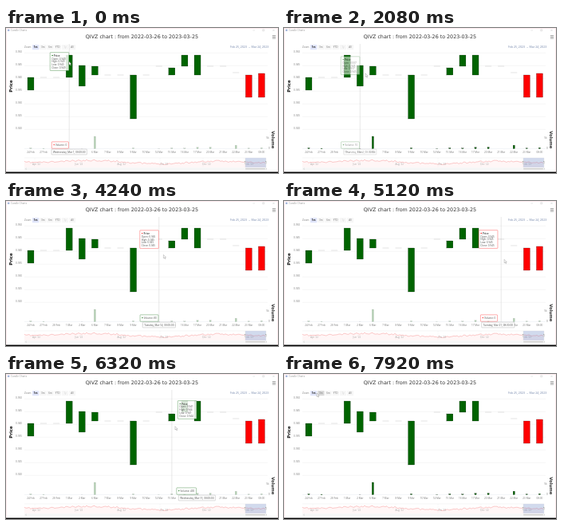
Write an HTML page that moves like this. It is 341 px wide and 182 px high and loops after 8000 ms.

```html
<!DOCTYPE html>
<html lang="en">
<head>
<meta charset="utf-8">
<title>Price chart</title>
<style>
html, body { margin: 0; width: 100%; height: 100%; overflow: hidden; background: #fff; }
svg { display: block; width: 100vw; height: 100vh; }
text { font-family: "Open Sans", "Liberation Sans", sans-serif; font-size: 3.1px; fill: #777; }
.title { font: 6.35px "DejaVu Sans", sans-serif; fill: #333; }
.axis { font: bold 5.4px "DejaVu Sans", sans-serif; fill: #111; }
.mid { text-anchor: middle; }
.end { text-anchor: end; }
</style>
</head>
<body>
<svg id="stage" viewBox="0 0 341 182" preserveAspectRatio="none"></svg>
<script>
const NS = 'http://www.w3.org/2000/svg';
const stage = document.getElementById('stage');

function add(parent, tag, attrs, content) {
  const el = document.createElementNS(NS, tag);
  for (const k in attrs) el.setAttribute(k, attrs[k]);
  if (content !== undefined) el.textContent = content;
  parent.appendChild(el);
  return el;
}
const rect = (p, x, y, width, height, fill, more) => add(p, 'rect', { x, y, width, height, fill, ...more });
const path = (p, d, stroke, w, more) => add(p, 'path', { d, stroke, 'stroke-width': w, fill: 'none', ...more });
const label = (p, x, y, s, cls = '', more) => add(p, 'text', { x, y, class: cls, ...more }, s);
const set = (el, attrs) => { for (const k in attrs) el.setAttribute(k, attrs[k]); };

const LOOP = 8000, TOP = 31, BASE = 151.5;
const GREEN = '#006400', RED = '#ff0000';

// open and close heights of each session
const bars = [[78, 62], [62, 62], [62, 62], [62, 34], [73, 47], [59, 48], [59, 59], [59, 59], [114, 59], [59, 59],
  [48, 48], [59, 50], [48, 34], [59, 34], [48, 48], [48, 48], [56, 56], [59, 87], [57, 87]];
const volume = [400, 200, 0, 0, 10, 6580, 0, 0, 420, 0, 80, 400, 300, 750, 800, 0, 1850, 300, 500];
const days = [24, 27, 28, 1, 2, 6, 7, 8, 9, 10, 14, 15, 16, 17, 20, 21, 22, 23, 24];
const week = ['Sunday', 'Monday', 'Tuesday', 'Wednesday', 'Thursday', 'Friday', 'Saturday'];
const month = i => i < 3 ? 'Feb' : 'Mar';
const barX = i => 31 + i * 16.08;
const price = y => (0.95 - (y - TOP) / 16 * 0.005).toFixed(3);
const volTop = i => BASE - volume[i] / 6580 * 15.5;

function drawWindow() {
  path(stage, 'M0.3 181V.3H340.7V181', '#f6d3d9', .6);
  rect(stage, 2, 1.6, 2.4, 2.4, '#a9b8dc');
  label(stage, 6, 3.9, 'Candle Charts', '', { style: 'fill:#999' });
  path(stage, 'M309.5 3h2.4M321.7 1.8h2v2h-2zM334.4 1.8l2.2 2.2m0-2.2l-2.2 2.2', '#999', .25);
  path(stage, 'M333.9 9.6h4.2m-4.2 1.7h4.2m-4.2 1.7h4.2', '#666', .6);
  label(stage, 170.4, 13.4, 'QIVZ chart : from 2022-03-26 to 2023-03-25', 'title mid');
  rect(stage, 0, 180.6, 341, 1.4, '#000');
}

const buttons = [];
function drawRange() {
  label(stage, 23, 25.4, 'Zoom');
  ['1m', '3m', '6m', 'YTD', '1y', 'All'].forEach((s, i) => {
    const x = 33 + i * 9.2;
    buttons.push(rect(stage, x, 21, 8.3, 6.2, i ? '#f7f7f7' : '#e0e5fa', { rx: .5 }));
    label(stage, x + 4.1, 25.4, s, 'mid', { style: i ? (i === 4 ? 'fill:#ccc' : '') : 'font-weight:bold;fill:#222' });
  });
  label(stage, 329.3, 24.8, 'Feb 25, 2023  →  Mar 24, 2023', 'end', { style: 'font-size:3.6px;fill:#6f82a8' });
}

function drawAxes() {
  for (let k = 0; k < 7; k++) {
    const y = TOP + k * 16;
    path(stage, `M23 ${y + .3}H328`, '#e8e8e8', .4);
    label(stage, 20, y + .3, price(y), 'end');
  }
  label(stage, 0, 0, 'Price', 'axis mid', { transform: 'translate(8.2 73) rotate(-90)' });
  label(stage, 0, 0, 'Volume', 'axis mid', { transform: 'translate(332.8 140.3) rotate(90)', style: 'font-size:5.3px;fill:#333' });
  path(stage, `M23 ${BASE}H328`, '#dde1ea', .35);
  label(stage, 328, 139.4, '5k', 'mid');
  label(stage, 329, 152, '0');
  bars.forEach((b, i) => label(stage, barX(i), 156.6, i === 18 ? '08:00' : days[i] + ' ' + month(i), 'mid'));
}

function drawNavigator() {
  let seed = 11, d = '';
  const rnd = () => (seed = seed * 16807 % 2147483647) / 2147483647;
  for (let x = 23; x <= 326; x += 2) {
    const slope = 168 + 1.6 * Math.sin(x / 24) - Math.sin(x / 61 + 1);
    d += `${d ? 'L' : 'M'}${x} ${(slope + (rnd() - .5) * 2.2).toFixed(2)}`;
  }
  path(stage, 'M36 163v12M88 163v12M140 163v12M193 163v12M247 163v12M299 163v12', '#f1f1f1', .3);
  path(stage, d + 'V175H23z', 'none', 0, { style: 'fill:#ff000009' });
  path(stage, d, '#f47a7a', .4);
  ["Apr '22", "Jun '22", "Aug '22", "Oct '22", "Dec '22", "Feb '23"].forEach((s, i) =>
    label(stage, 38 + i * 53.4, 172, s, 'mid', { style: 'fill:#aaa' }));
  rect(stage, 300, 163, 26, 12, '#6685c2', { opacity: .3 });
  path(stage, 'M23 163H300V175H326V163H300', '#ddd', .3);
  for (const x of [299.4, 325.4]) rect(stage, x, 167.2, 1.3, 3.6, '#f2f2f2', { stroke: '#999', 'stroke-width': .25 });
  rect(stage, 23, 175.3, 304, 2.8, '#f6f6f6');
  rect(stage, 300, 176, 25, 1.4, '#d0d0d0', { rx: .7 });
  path(stage, 'M25.6 176l-1 .8l1 .8M325.8 176l1 .8l-1 .8', '#888', .3);
}

drawWindow();
drawRange();
drawAxes();
drawNavigator();

const cross = path(stage, '', '#c4c4c4', .4);
const candles = add(stage, 'g', {}), volBars = add(stage, 'g', {});
bars.forEach(([open, close], i) => {
  const x = barX(i);
  if (open === close) path(candles, `M${x - 4} ${close}h8`, '#888', .25);
  else rect(candles, x - 4, Math.min(open, close), 8, Math.abs(open - close),
    close < open ? GREEN : RED, { stroke: '#000', 'stroke-width': .2 });
  if (volume[i]) rect(volBars, x - 1.1, volTop(i), 2.2, BASE - volTop(i), GREEN, { stroke: '#000', 'stroke-width': .2 });
});

const tips = add(stage, 'g', {});
function makeTip(lines, height) {
  const g = add(tips, 'g', {});
  const box = rect(g, 0, 0, 23.6, height, '#fff', { 'fill-opacity': .85, rx: .6, 'stroke-width': .32 });
  const dot = add(g, 'circle', { cx: 2.9, cy: 3.8, r: .7 });
  const rows = Array.from({ length: lines }, (_, i) => label(g, i ? 2 : 4.6, 5 + i * 3.9, '', '', { style: 'fill:#555' }));
  return { g, box, dot, rows };
}
const priceTip = makeTip(5, 22.8), volTip = makeTip(1, 8.4), dateTip = makeTip(1, 6.8);
priceTip.rows[0].style.fontWeight = 'bold';
dateTip.dot.remove();
set(dateTip.rows[0], { x: 2, y: 4.6 });
set(dateTip.box, { stroke: '#888' });

const cursor = path(stage, 'M0 0V4.4L1.1 3.5L1.9 5.2L2.6 4.9L1.8 3.2H3.1Z', '#444', .25, { style: 'fill:#fff' });

// pointer stops: time, x, y
const stops = [[0, 79, 42], [420, 81, 44], [700, 92, 52], [1800, 94, 54], [2080, 102, 57], [2300, 106, 58],
  [2640, 121, 60], [2980, 123, 62], [3520, 164, 66], [4050, 197, 67.5], [4600, 198.5, 67.5], [5250, 285, 74],
  [5480, 317, 78], [5970, 316, 80], [6100, 300, 76], [6560, 113, 54], [7040, 109, 46], [7380, 76, 30],
  [7620, 41, 24], [8000, 41, 24]];

function pointer(t) {
  const n = Math.max(1, stops.findIndex(s => s[0] > t));
  const [a, b] = [stops[n - 1], stops[n]];
  const k = (t - a[0]) / (b[0] - a[0]), e = k * k * (3 - 2 * k);
  return [a[1] + (b[1] - a[1]) * e, a[2] + (b[2] - a[2]) * e];
}

const hovers = [];
for (let t = 0; t < LOOP; t += 10) {
  const [x, y] = pointer(t);
  if (y < TOP) continue;
  const i = Math.max(0, Math.min(18, Math.round((x - 31) / 16.08)));
  if (!hovers.length || hovers[hovers.length - 1].i !== i) hovers.push({ t, i });
}

const anchor = i => [barX(i), Math.max(TOP - .3, bars[i][1] - 11.2), Math.min(142.8, volTop(i) - 4.2)];

// each hover pulls the boxes towards its own anchor
function hoverAt(t) {
  let pos = anchor(hovers[0].i), cur = hovers[0].i;
  hovers.forEach((h, n) => {
    if (h.t > t) return;
    const until = Math.min(t, n + 1 < hovers.length ? hovers[n + 1].t : t);
    const k = 1 - Math.exp((h.t - until) / 45), to = anchor(h.i);
    pos = pos.map((v, j) => v + (to[j] - v) * k);
    cur = h.i;
  });
  return { cur, pos };
}

function paint(tip, color) {
  tip.box.setAttribute('stroke', color);
  tip.dot.setAttribute('fill', color);
}

let shown = -1;
function fill(i) {
  if (i === shown) return;
  shown = i;
  const [open, close] = bars[i];
  ['Price', 'Open: ' + price(open), 'High: ' + price(Math.min(open, close)),
    'Low: ' + price(Math.max(open, close)), 'Close: ' + price(close)].forEach((s, n) => priceTip.rows[n].textContent = s);
  paint(priceTip, close < open ? GREEN : RED);
  const v = volume[i];
  volTip.rows[0].textContent = 'Volume: ' + (v > 999 ? (v / 1000).toFixed(2) + 'k' : v);
  paint(volTip, v ? GREEN : RED);
  const day = new Date(2023, i < 3 ? 1 : 2, days[i]).getDay();
  dateTip.rows[0].textContent = `${week[day]}, ${month(i)} ${days[i]}, 08:00:00`;
  for (const [tip, pad] of [[volTip, 6.8], [dateTip, 4]]) {
    tip.w = tip.rows[0].getComputedTextLength() + pad;
    tip.box.setAttribute('width', tip.w);
  }
}

const move = (tip, x, y) => tip.g.setAttribute('transform', `translate(${x.toFixed(2)} ${y.toFixed(2)})`);

function draw(t) {
  const { cur, pos: [x, py, vy] } = hoverAt(t);
  fill(cur);
  move(priceTip, x - 24, py);
  move(volTip, x - volTip.w - .8, vy);
  move(dateTip, Math.min(340.7 - dateTip.w, x - dateTip.w / 2), 152.1);
  // between two points no series is in focus
  const idle = (t > 1880 && t < 2250) || t > 7360;
  const alpha = Math.max(0, Math.min(idle ? .65 : 1, (7700 - t) / 200));
  tips.setAttribute('opacity', alpha);
  set(cross, { d: `M${barX(cur)} 20V${BASE}`, opacity: t < 7700 ? 1 : 0 });
  volBars.setAttribute('opacity', idle ? 1 : .3);
  const [cx, cy] = pointer(t);
  cursor.setAttribute('transform', `translate(${cx} ${cy})`);
  buttons[1].setAttribute('fill', t > 7590 ? '#d9d9d9' : '#f7f7f7');
}

const start = performance.now();
function tick(now) {
  draw(Math.max(0, now - start) % LOOP);
  requestAnimationFrame(tick);
}
draw(0);
requestAnimationFrame(tick);
</script>
</body>
</html>
```
